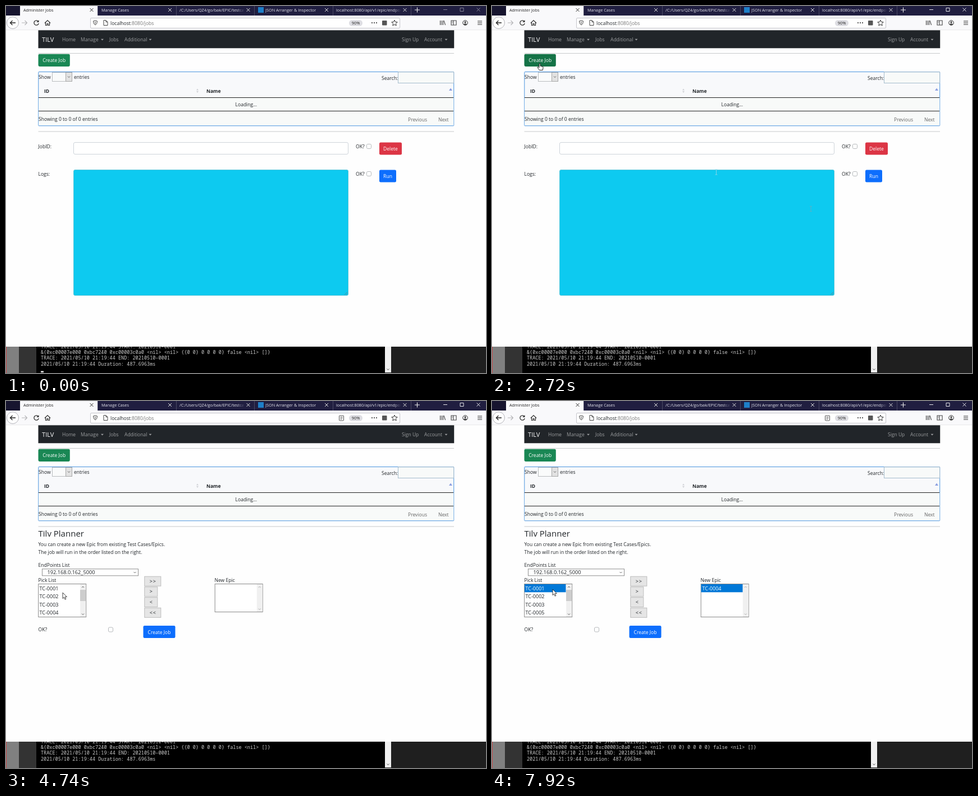
An HTML page that plays this animation: 855 by 655 pixels, repeating every 8000 ms.

```html
<!DOCTYPE html>
<html lang="en">
<head>
<meta charset="utf-8">
<title>Administer Jobs</title>
<style>
html, body { margin: 0; width: 100%; height: 100%; overflow: hidden; background: #fff; }
svg { display: block; width: 855px; height: 655px; }
text { font-family: "Open Sans", sans-serif; font-size: 8.55px; fill: #212529; white-space: pre; }
.mono { font-family: "Noto Sans Mono", monospace; font-size: 8.52px; fill: #ccc; }
.tab { font-size: 7.3px; }
.bold { font-weight: 700; }
.move { font-size: 9px; letter-spacing: .9px; }
</style>
</head>
<body>
<svg id="stage" viewBox="0 0 855 655"></svg>
<script>
const LOOP = 8000;
const stage = document.getElementById('stage');
const $ = id => document.getElementById(id);
const esc = s => s.replace(/&/g, '&amp;').replace(/</g, '&lt;');
const rect = (x, y, w, h, fill, more = '') =>
  `<rect x="${x}" y="${y}" width="${w}" height="${h}" fill="${fill}" ${more}/>`;
const box = (x, y, w, h, fill, stroke, more = '') =>
  rect(x + .5, y + .5, w - 1, h - 1, fill, `stroke="${stroke}" ${more}`);
const text = (x, y, s, fill = '#212529', more = '') =>
  `<text x="${x}" y="${y}" style="fill:${fill}" ${more}>${esc(s)}</text>`;
const line = (d, color = '#333', w = 1, more = '') =>
  `<path d="${d}" fill="none" stroke="${color}" stroke-width="${w}" ${more}/>`;
const shape = (d, fill, more = '') => `<path d="${d}" fill="${fill}" ${more}/>`;
const group = (id, body) => `<g id="${id}">${body}</g>`;
const cross = (x, y, r, color, w = 1) =>
  line(`M${x - r} ${y - r}l${2 * r} ${2 * r}m0 ${-2 * r}l${-2 * r} ${2 * r}`, color, w);
const chevron = (x, y, color = '#555', up = 1) =>
  line(`M${x - 2} ${y - up}l2 ${2 * up} 2 ${-2 * up}`, color, .9);
const caret = (x, y, color) => shape(`M${x} ${y}h5l-2.5 2.6z`, color);
const button = (id, x, y, w, h, fill, label) =>
  rect(x, y, w, h, fill, `id="${id}" rx="2.3"`) +
  text(x + w / 2, y + h / 2 + 3.6, label, '#fff', 'text-anchor="middle"');
const checkbox = (x, y) => box(x, y, 9, 9, '#fff', '#b5b8bb', 'rx="2"');
const beam = (x, y, color) => line(`M${x - 2} ${y - 4.5}h4m-2 0v9m-2 0h4`, color, 1);

function tabBar() {
  const tabs = [
    [170, 'Manage Cases'],
    [309, '/C:/Users/QZ4/go/bak/EPIC/testcases'],
    [462, 'JSON Arranger & Inspector'],
    [588, 'localhost:8080/api/v1/epic/endpoints']
  ];
  let out = rect(0, 0, 855, 17, '#201e40') + rect(0, 0, 25, 17, '#17152f') +
    rect(25, 0, 138, 17, '#f9f9fb');
  for (const x of [163, 303, 442, 582, 721]) out += rect(x, 0, 1, 17, '#4a4964');
  tabs.forEach(([x, s], i) => {
    const end = 424 + 139.5 * (i - 1);
    out += `<clipPath id="clip${i}">${rect(x, 0, end - x, 17, '#fff')}</clipPath>` +
      text(x, 10, s, '#e4e4ec', `class="tab" clip-path="url(#clip${i})"`);
    if (i % 2) out += rect(end - 12, 1, 13, 15, 'url(#fade)');
  });
  for (let i = 0; i < 5; i++) out += cross(152.5 + 139.5 * i, 7, 3, i ? '#ddd' : '#333');
  out += rect(449, 2, 10, 10, '#1e7fc8') + line('M728 7h9m-4.5-4.5v9', '#eee', 1.1);
  out += group('winCtl', line('M779 6.5h7m23-3h6v6h-6z', '#fff', .9) + cross(841.5, 6.5, 3, '#fff', .9));
  return out + text(31, 10, 'Administer Jobs', '#222', 'id="title" class="tab"') +
    group('glass', line('M32 2.5h7m-7 9h7m-6-9v2l2 2.5-2 2.5v2m5-9v2l-2 2.5 2 2.5v2', '#666', .9));
}

function toolBar() {
  let out = rect(0, 17, 855, 26, '#f9f9fb') + rect(0, 42.5, 855, .6, '#ddd');
  out += '<circle cx="12" cy="30" r="10.5" fill="#fff" stroke="#b4b4ba"/>';
  out += line('M17 30H7.5m4-4-4 4 4 4', '#222', 1.3) + line('M28 30h9.5m-4-4 4 4-4 4', '#b5b5b8', 1.2);
  out += group('reload', line('M57.5 27.5a4.2 4.2 0 1 0 .7 3.5', '#333', 1.3) + shape('M58.5 25v4h-4z', '#333'));
  out += group('stop', cross(53.5, 30, 4, '#333', 1.3));
  out += line('M69 30.5l5-5 5 5m-8.5-1v5h2.5v-3h2v3h2.5v-5', '#333', 1.2);
  out += box(150, 21, 552, 19, '#fff', '#c4c4ca', 'id="urlBox" rx="1.5"');
  out += line('M159 26l3.5 1q0 5-3.5 7-3.5-2-3.5-7zM159 28v4', '#444', 1);
  out += line('M174 25.5h4l3 3v6h-7zm4 0v3h3', '#444', 1);
  out += '<text x="186" y="33.5">localhost<tspan fill="#777">:8080/jobs</tspan></text>';
  out += group('reader', box(593, 25.5, 9, 10, '#fff', '#555', 'rx="1"') + line('M595.5 28.5h4m-4 2h4m-4 2h3', '#555', .8));
  out += rect(611, 25, 24, 11, '#dedee3', 'rx="5.5"') +
    text(623, 33, '90%', '#222', 'text-anchor="middle" class="tab"');
  for (const x of [652, 656, 660]) out += `<circle cx="${x}" cy="30" r="1.1" fill="#333"/>`;
  out += rect(670, 26, 8.5, 8.5, '#555', 'rx="1"');
  out += line('M692 25l1.5 3.4 3.7.4-2.8 2.5.8 3.7-3.2-1.9-3.2 1.9.8-3.7-2.8-2.5 3.7-.4z', '#333', 1);
  out += line('M773.5 26v8m2.5-8v8m2.5-8v8m1.5-8l2.5 8', '#444', 1.1);
  out += line('M793 26h9v8h-9zm4 0v8m-2.5-6h1m-1 2h1', '#444', 1.1);
  out += '<circle cx="818" cy="30" r="4.3" fill="none" stroke="#333"/><circle cx="818" cy="28.8" r="1.6" fill="#333"/>' +
    shape('M815 32.5q3-2.5 6 0-3 2.5-6 0z', '#333');
  return out + line('M840 27h8m-8 3h8m-8 3h8', '#333', 1.2);
}

function pageTop() {
  const nav = 'style="font-size:8.5px;fill:#9b9d9f"';
  let out = rect(57.5, 43.3, 740.7, 32, '#212529') +
    '<text x="64" y="64.3" style="font-size:11.1px;fill:#fff">TILV</text>';
  for (const [x, s] of [[100, 'Home'], [133, 'Manage'], [184, 'Jobs'], [211, 'Additional'], [705, 'Sign Up'], [745, 'Account']])
    out += `<text x="${x}" y="63.3" ${nav}>${s}</text>`;
  for (const x of [169, 254.5, 781.5]) out += caret(x, 58.8, '#9b9d9f');
  out += rect(57.5, 84, 740.5, 1, '#c8cacb') + rect(57.5, 223.5, 740.5, 1, '#c8cacb');
  out += rect(55.7, 84, 60, 26, '#a3cfbb', 'id="ring" rx="4"') +
    button('create', 57.5, 85.7, 56.3, 22.2, '#198754', 'Create Job');
  out += box(57.3, 117, 740.9, 97.3, '#f8f9fb', '#4a94de', 'rx="1"') + rect(58.3, 164, 739, 49, '#f8faf9');
  out += rect(58, 163, 739, 1, '#222') + rect(58, 187, 739, 1, '#222');
  out += text(58, 130, 'Show') + text(121, 130, 'entries') + box(82, 118, 36, 17, '#fafbfb', '#b9bcbf') +
    box(106, 118, 12, 17, '#e2e2e2', '#a8a8a8') + chevron(112, 126.5);
  out += text(669, 131.5, 'Search:') + box(698, 117.3, 100, 20.7, '#f8faf9', '#a5bccd');
  out += text(68, 154.5, 'ID', '#212529', 'class="bold"') + text(357, 154.5, 'Name', '#212529', 'class="bold"');
  out += shape('M339 150.5l2-3 2 3zm0 1.5h4l-2 3z', '#cfd1d6') + shape('M789 151l3-4.5 3 4.5z', '#8c9fe0');
  out += text(427.8, 178.5, 'Loading...', '#212529', 'text-anchor="middle"');
  return out + text(58, 205, 'Showing 0 to 0 of 0 entries') +
    text(716, 205.5, 'Previous', '#666') + text(770, 205.5, 'Next', '#666');
}

function jobsPage() {
  return text(57.5, 253.5, 'JobID:') + box(120, 243, 490, 22, '#fff', '#ced4da', 'rx="2.5"') +
    text(623, 254, 'OK?') + checkbox(642, 246) + button('del', 665, 243.5, 40, 22, '#dc3545', 'Delete') +
    text(57.5, 303, 'Logs:') + box(120, 292, 490, 225, '#0dcaf0', '#55c5da', 'rx="2.5"') +
    text(623, 303, 'OK?') + checkbox(642, 295) + button('run', 665, 292.5, 30, 22, '#0d6efd', 'Run') +
    line('M603 515.5l5-5m-2 5l2-2', '#4d8a98', 1) +
    group('ghostA', beam(568, 362, '#52b4cb')) + group('ghostB', beam(399.5, 296.5, '#7fd5e8'));
}

function listBox(x, id) {
  return box(x, 326, 86, 60, '#fff', '#8a8a8a', `id="${id}"`) + rect(x + 75, 327, 10, 58, '#f0f0f0', `id="${id}Bar"`);
}

function creatorPage() {
  let out = '<text x="57.5" y="241.5" style="font-size:15px">Tilv Planner</text>' +
    text(57.5, 259.3, 'You can create a new Epic from existing Test Cases/Epics.') +
    text(57.5, 272.5, 'The job will run in the order listed on the right.') +
    text(57.5, 296, 'EndPoints List') + box(64, 299.3, 172, 13, '#fff', '#8f8f8f', 'id="endpoint"') +
    '<text x="73.5" y="309" style="font-size:9.2px">192.168.0.162_5000</text>' + chevron(229.5, 306) +
    text(57.5, 323, 'Pick List') + text(371.5, 323, 'New Epic') + listBox(57.2, 'pick') + listBox(371.7, 'epic');
  out += chevron(137, 332, '#555', -1) + chevron(137, 380.5) + rect(132, 337, 10, 20, '#cdcdcd');
  out += chevron(451.7, 332, '#aaa', -1) + group('epicDown', chevron(451.7, 371.5, '#aaa'));
  out += rect(58, 327, 73.5, 14.3, '#0078d7', 'id="sel"') +
    line('M58.5 371h72.500v13.5h-72.500z', '#d88a35', .7, 'id="dots" stroke-dasharray="1 1" opacity=".4"');
  for (let i = 0; i < 4; i++)
    out += `<text id="row${i}" x="59.5" y="${337.8 + 14.5 * i}" style="font-size:9px"></text>`;
  out += group('added', rect(372.5, 327, 74, 14.3, '#0078d7') + '<text x="374.5" y="337.8" style="font-size:9px;fill:#fff">TC-0004</text>');
  [['>>', 30], ['>', 24], ['<', 24], ['<<', 30]].forEach(([s, w], i) => {
    const y = 312.7 + 18.7 * i;
    out += box(246.3, y, w, 18, '#e5e5e5', '#bcbcbc', `id="move${i}"`) +
      text(246.7 + w / 2, y + 12, s, '#212529', 'text-anchor="middle" class="move"');
  });
  return out + text(57.5, 411, 'OK?') + checkbox(182, 403.5) + button('submit', 244.5, 401, 57, 22, '#0d6efd', 'Create Job');
}

function terminal() {
  const log = ['TRACE: 2021/05/10 21:19:44 START: 20210510-0001',
    '&{0xc00007e000 0xbc7240 0xc00003c0a0 <nil> <nil> {{0 0} 0 0 0 0} false <nil> []}',
    'TRACE: 2021/05/10 21:19:44 END: 20210510-0001',
    '2021/05/10 21:19:44 Duration: 487.6963ms'];
  return rect(0, 608, 855, 47, '#1f1f1f') + rect(0, 608, 23, 47, '#808080') + rect(0, 608, 1, 47, '#c84b4b') +
    rect(23, 608, 31, 47, '#333') + rect(54, 608, 621, 47, '#000') +
    '<clipPath id="term"><rect x="54" y="608" width="621" height="47"/></clipPath><g clip-path="url(#term)">' +
    log.map((s, i) => text(62, 611 + 10.2 * i, s, '#ccc', 'class="mono"')).join('') + '</g>' +
    rect(62, 651.5, 5, 2.5, '#e8e8e8', 'id="blink"') + rect(675, 608, 11, 46, '#f0f0f0') + chevron(680.5, 648.5, '#333');
}

stage.innerHTML =
  '<defs><linearGradient id="fade"><stop offset="0" stop-color="#201e40" stop-opacity="0"/><stop offset="1" stop-color="#201e40"/></linearGradient></defs>' +
  rect(0, 0, 855, 655, '#fefefe') + tabBar() + toolBar() + pageTop() +
  group('jobs', jobsPage()) + group('creator', creatorPage()) + terminal() +
  group('status', box(-1, 596, 10, 13, '#f9f9fb', '#d5d5d9', 'id="statusBox"') + text(2, 606, '', '#333', 'id="statusText" class="tab"')) +
  group('arrow', shape('M0 0V10.5L2.4 8.3 4.1 12.2 5.8 11.5 4.2 7.6H7.4Z', '#fff', 'stroke="#111" stroke-width=".8"')) +
  group('hand', shape('M-1 1Q0-.6 1 1V5L4.8 6Q6.4 6.3 6.1 8L5.2 12.5H-.5L-3.8 8Q-4.2 6.5-2.8 6.8L-1 8Z', '#fff', 'stroke="#111" stroke-width=".9"')) +
  group('beam', beam(0, 0, '#222'));

// Pointer stops: time, x, y
const path = [
  [170, 735, 427], [280, 568, 362], [390, 399, 296], [510, 330, 215], [950, 300, 168],
  [1070, 280, 140], [1290, 225, 28], [1400, 205, 40], [1510, 191, 57], [2280, 191, 57],
  [2500, 130, 85], [2720, 85, 102], [3730, 85, 102], [3950, 108, 200], [4200, 118, 303],
  [4530, 103, 343], [4640, 101, 342], [4800, 101, 342], [5080, 92, 374], [5530, 92, 374],
  [5870, 199, 369], [6120, 199, 369], [6500, 256, 337], [7020, 256, 337], [7350, 112, 338], [7580, 108, 336]
];

function pointerAt(t) {
  const i = path.findIndex(p => p[0] > t);
  if (i < 0) return path[path.length - 1].slice(1);
  if (!i) return path[0].slice(1);
  const [a, b] = [path[i - 1], path[i]];
  const k = (t - a[0]) / (b[0] - a[0]);
  return [a[1] + (b[1] - a[1]) * k, a[2] + (b[2] - a[2]) * k];
}

// display, unlike visibility, also hides nested parts
const show = (id, on) => { $(id).style.display = on ? '' : 'none'; };
const set = (id, name, value) => $(id).setAttribute(name, value);

function draw(t) {
  const within = (a, b) => t >= a && t < b;
  const step = 112.3;
  const [x, y] = pointerAt(170 + Math.floor((t - 170) / step + .31) * step);
  const over = (l, top, r, bottom) => t >= 170 && x >= l && x <= r && y >= top && y <= bottom;
  const creator = t >= 3400;
  const loading = within(2060, 2390) || within(3170, 3400);

  show('jobs', !creator);
  show('creator', creator);
  show('ghostA', t >= 390);
  show('ghostB', t >= 500);
  show('glass', loading);
  show('stop', loading);
  show('reload', !loading);
  set('title', 'x', loading ? 44 : 31);
  set('winCtl', 'opacity', t < 1950 ? .5 : 1);
  show('reader', t >= 3610);
  show('blink', (t + 110) % 1060 < 530);

  const onUrl = over(150, 21, 702, 40);
  const onJobs = over(180, 50, 204, 70);
  const onCreate = over(57, 86, 114, 108);
  set('urlBox', 'stroke', onUrl ? '#8f8f98' : '#c4c4ca');
  set('create', 'fill', onCreate && !creator ? '#157347' : '#198754');
  show('ring', within(3060, 3400));

  const wide = within(3170, 3400);
  show('status', onJobs || wide);
  set('statusBox', 'width', wide ? 168 : 70);
  $('statusText').textContent = wide ? 'localhost' : 'localhost:8080/jobs';

  const moved = t >= 6660;
  const picked = within(5200, 6660) ? 3 : t >= 7800 ? 0 : -1;
  [1, 2, 3, moved ? 5 : 4].forEach((n, i) => {
    $('row' + i).textContent = 'TC-000' + n;
    $('row' + i).style.fill = i === picked ? '#fff' : '#212529';
  });
  show('sel', picked >= 0);
  set('sel', 'y', 327 + 14.5 * Math.max(picked, 0));
  show('dots', picked === 3);
  show('added', moved);
  set('epic', 'height', moved ? 59 : 50);
  set('epicBar', 'height', moved ? 58 : 49);
  set('epicDown', 'transform', `translate(0 ${moved ? 9 : 0})`);
  set('endpoint', 'stroke', over(64, 299, 236, 312) ? '#444' : '#8f8f8f');
  set('move1', 'fill', over(246, 331, 270, 349) ? '#d2d2d6' : '#e5e5e5');
  set('move1', 'stroke', within(6600, 7800) ? '#777' : '#bcbcbc');

  const pointer = t < 170 ? '' :
    onUrl || (!creator && over(120, 293, 609, 517)) ? 'beam' : onJobs || onCreate ? 'hand' : 'arrow';
  for (const id of ['arrow', 'hand', 'beam']) {
    show(id, id === pointer);
    set(id, 'transform', `translate(${x.toFixed(1)} ${y.toFixed(1)})`);
  }
}

const start = performance.now();
function tick() {
  draw((performance.now() - start) % LOOP);
  requestAnimationFrame(tick);
}
tick();
</script>
</body>
</html>
```
